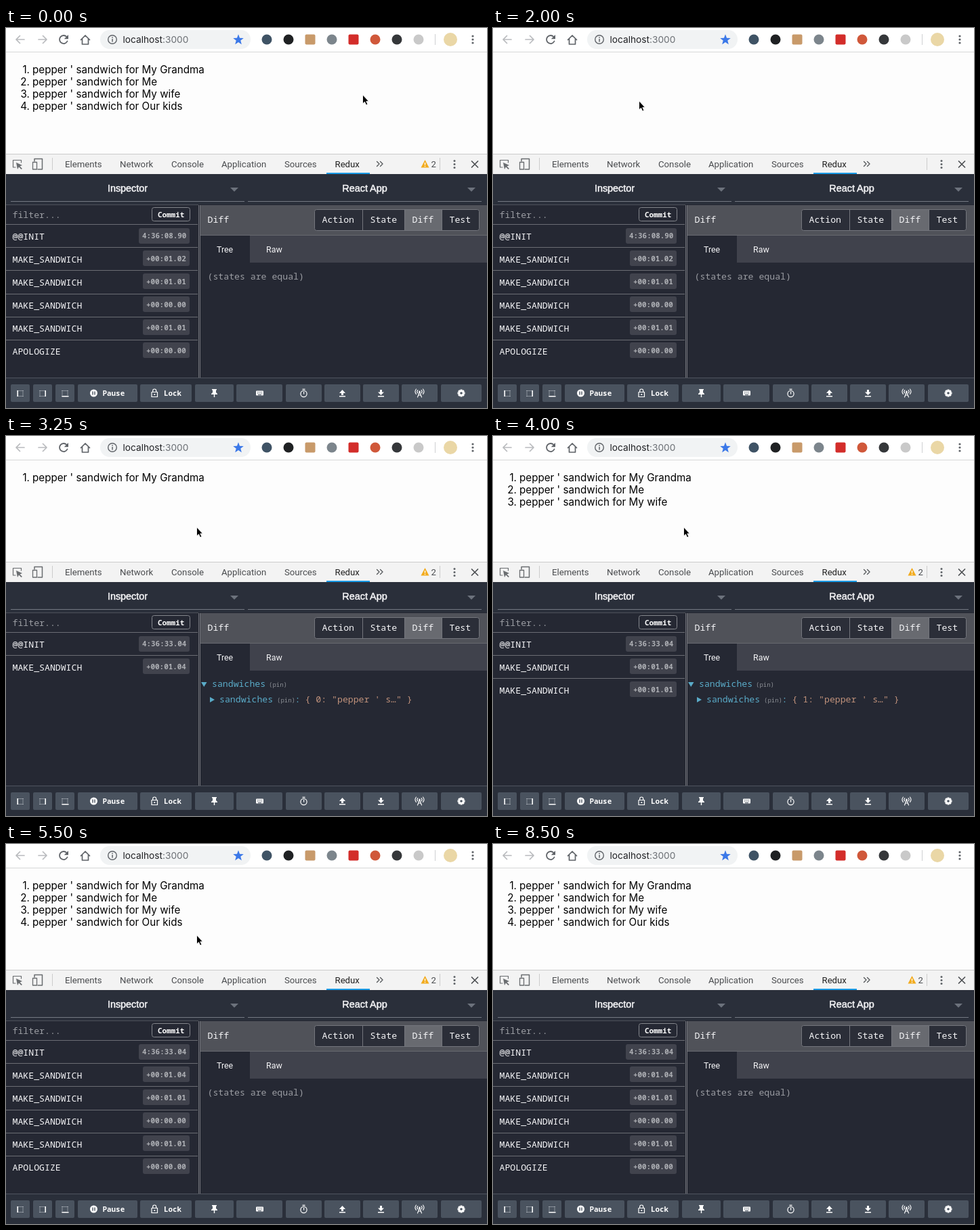
Recreate the animation shown at these times as an HTML page. Size 710 by 562 pixels, loop 9.25 s.

```html
<!DOCTYPE html>
<html lang="en">
<head>
<meta charset="utf-8">
<title>Sandwich store inspector</title>
<style>
html, body { margin: 0; width: 100%; height: 100%; overflow: hidden; background: #fdfdfd; }
svg { display: block; width: 710px; height: 562px; }
text { white-space: pre; }
.page { font: 15.2px Inter, sans-serif; fill: #000; }
.url { font: 13.7px Inter, sans-serif; fill: #202124; }
.tab { font: 13.2px Roboto, sans-serif; fill: #4a4c4f; }
.head { font: 14.4px "Liberation Sans", Arial, sans-serif; fill: #f4f4f6; stroke: #f4f4f6; stroke-width: .5px; text-anchor: middle; }
.sub { font: 12.4px Roboto, sans-serif; fill: #f4f4f6; }
.mono { font: 13.2px "Noto Sans Mono", monospace; fill: #f6f6f8; }
.bold { font: bold 10.9px "Noto Sans Mono", monospace; fill: #fff; }
.pin { font: 9px "Noto Sans Mono", monospace; fill: #8d9096; }
.dim { fill: #9b9da3; }
.line { fill: none; stroke-linecap: round; stroke-linejoin: round; }
</style>
</head>
<body>
<svg id="stage" viewBox="0 0 710 562" xmlns="http://www.w3.org/2000/svg">
  <g id="base"></g>
  <g id="live"></g>
</svg>
<script>
const LOOP = 9250, STEP = 250;
const BLUE = '#5aabc8', ORANGE = '#c2937c', ICON = '#5f6368', PANE = '#252833';

const text = (x, y, s, cls, extra = '') => `<text x="${x}" y="${y}" class="${cls}" ${extra}>${s}</text>`;
const rect = (x, y, w, h, fill, extra = '') =>
  `<rect x="${x}" y="${y}" width="${w}" height="${h}" fill="${fill}" ${extra}/>`;
const dot = (x, y, r, fill) => `<circle cx="${x}" cy="${y}" r="${r}" fill="${fill}"/>`;
const ring = (x, y, r, c, w = 1) => `<circle cx="${x}" cy="${y}" r="${r}" fill="none" stroke="${c}" stroke-width="${w}"/>`;
const line = (d, c, w = 1) => `<path class="line" d="${d}" stroke="${c}" stroke-width="${w}"/>`;
const fill = (d, c) => `<path d="${d}" fill="${c}"/>`;
const dots = (x, y, gap, r, c) => [-gap, 0, gap].map(k => dot(x, y + k, r, c)).join('');

function star(cx, cy, r, c) {
  let d = '';
  for (let i = 0; i < 10; i++) {
    const a = i * Math.PI / 5 - Math.PI / 2, q = i % 2 ? r * .42 : r;
    d += `${i ? 'L' : 'M'}${(cx + q * Math.cos(a)).toFixed(2)},${(cy + q * Math.sin(a)).toFixed(2)}`;
  }
  return fill(d + 'z', c);
}

function browserBar() {
  const marks = [[385, '#3f5365'], [417, '#1f2123'], [449, '#c89a6a', 1], [481, '#7c858c'],
    [513, '#d32d2a', 1], [545, '#d0583a'], [577, '#35373a'], [609, '#c9c9c9']];
  return rect(0, 0, 710, 36, '#fff') + rect(0, 35, 710, 1, '#d6d7d8') +
    line('M27,17H15.5M20.5,11.5L15,17L20.5,22.5M48,17H59.5M54.500,11.5L60,17L54.5,22.5', '#b9bbbe', 1.7) +
    line('M110.500,17.500L117,11L123.500,17.500M112.500,16V24H121.500V16', ICON, 1.7) +
    marks.map(([x, c, sq]) => sq ? rect(x - 7.5, 9.5, 15, 15, c, 'rx="2"') : dot(x, 17, 7.5, c)).join('') +
    rect(633, 9, 1, 16, '#cfd0d2') + dot(656, 17, 10, '#ead7a6') + dots(689, 17, 5, 1.6, ICON);
}

function toolbar() {
  const tabs = [[87, 'Elements'], [168, 'Network'], [244, 'Console'], [318, 'Application'], [411, 'Sources'], [485.5, 'Redux']];
  return rect(0, 186, 710, 30, '#f3f3f3') + rect(0, 186, 710, 1, '#cbcbcb') +
    rect(473, 214, 64, 2, '#1a9be6') +
    line('M14,206H10.500V195.500H22.500V199', '#6a6d70', 1.2) + fill('M15,199L24,203L20.500,204.500L24,208L22.500,209L19,205.500L17,209z', '#6a6d70') +
    line('M42,197V193.500H53.500V209H47', '#6a6d70', 1.5) + line('M39.500,198.500H45.500V209H39.500z', '#6a6d70', 1.3) +
    rect(68, 192, 1, 18, '#ccc') + rect(640, 192, 1, 18, '#ccc') +
    tabs.map(([x, s]) => text(x, 206, s, 'tab', s === 'Redux' ? 'style="fill:#222"' : '')).join('') +
    line('M547.500,197.500L551,201L547.500,204.500M552.500,197.500L556,201L552.500,204.500', '#55585b', 1.4) +
    dots(662, 201.5, 5, 1.5, ICON) + line('M687.500,197L696.500,206M696.500,197L687.500,206', '#4d5053', 1.7);
}

function header() {
  const caret = x => fill(`M${x - 6},236H${x + 6}L${x},242z`, '#6c727c');
  return rect(0, 216, 710, 346, '#2a2f3a') +
    text(179.5, 242, 'Inspector', 'head') + text(529.5, 242, 'React App', 'head') + caret(337) + caret(687) +
    rect(7, 256, 345, 1, '#747983') + rect(357, 256, 345, 1, '#747983');
}

function panes() {
  const tabs = [[467, 'Action'], [538, 'State'], [600, 'Diff'], [655, 'Test']];
  return rect(0, 261, 710, 256, PANE) + rect(0, 261, 284, 1, '#4e5159') +
    text(9.5, 281, 'filter...', 'mono dim') + rect(0, 290, 283, 1, '#6b6d74') +
    rect(284, 262, 1, 255, '#74767c') + rect(286, 262, 1, 255, '#74767c') +
    rect(287, 262, 423, 45, '#505259') + rect(287, 306, 423, 1, '#676970') + text(297.5, 288, 'Diff', 'mono') +
    rect(455.5, 268.5, 243, 31, '#2b2e38', 'rx="3" stroke="#74767d"') + rect(588, 269, 55, 30, '#686a70') +
    [526, 588, 643].map(x => rect(x, 269, 1, 30, '#74767d')).join('') +
    tabs.map(([x, s]) => text(x - .5, 288, s, 'mono')).join('') +
    rect(287, 307, 423, 40, '#40424c') + rect(287, 307, 73, 40, PANE) +
    text(311, 332, 'Tree', 'sub') + text(384, 332, 'Raw', 'sub');
}

function dock(x, side) {
  let s = '';
  for (let k = 0; k <= 8; k += 2)
    for (const [a, b] of [[k, 0], [k, 8], [0, k], [8, k]]) s += rect(x - 5 + a, 536 + b, 1, 1, '#c9ced4');
  return s + (side === 'b' ? rect(x - 5, 544, 10, 1.5, '#fff') : rect(side === 'l' ? x - 5 : x + 3, 536, 1.5, 9, '#fff'));
}

function footer() {
  const W = '#fff';
  const spans = [[7, 35], [40, 68], [73, 101], [106, 194], [198, 274], [279, 336], [340, 408],
    [413, 466], [470, 523], [527, 580], [584, 637], [642, 702]];
  const gear = [0, 45, 90, 135].map(a => `<rect x="670.5" y="534.500" width="3" height="11" fill="#fff" transform="rotate(${a} 672 540)"/>`).join('');
  const arrow = (x, up) => fill(up ? `M${x - 4.5},540L${x},535L${x + 4.5},540H${x + 1.5}V543H${x - 1.5}V540z`
    : `M${x - 4.5},538.500L${x},543L${x + 4.5},538.500H${x + 1.5}V535H${x - 1.5}V538.500z`, W) + rect(x - 4.5, 544, 9, 1.5, W);
  let keys = '';
  for (let i = 0; i < 8; i++) keys += rect(371 + i % 4 * 2, 538 + (i >> 2) * 2, 1, 1, '#4a5460');
  return rect(0, 517, 710, 1, '#4f545e') +
    spans.map(([a, b]) => rect(a, 527, b - a, 26, '#4a535f', 'rx="2"')).join('') +
    dock(21.5, 'l') + dock(54.5, 'r') + dock(87.5, 'b') +
    dot(129.5, 540, 5.5, W) + rect(127.3, 537.5, 1.4, 5, '#4a535f') + rect(130.3, 537.5, 1.4, 5, '#4a535f') +
    text(142.5, 544, 'Pause', 'bold') + text(233, 544, 'Lock', 'bold') +
    line('M215,538.500H223.500V545.500H215zM216.700,538V536.500A2.500,2.500 0 0 1 221.700,536.500V538', W, 1.2) + dot(219.3, 542, 1.1, W) +
    fill('M304,534H311V535.500H310V539L312,541V542H308.200V546H306.800V542H303V541L305,539V535.500H304z', W) +
    rect(369, 536.5, 11, 7, W, 'rx="1"') + keys + rect(372, 542, 5, 1, '#4a5460') +
    ring(439.5, 541, 4.6, W, 1.2) + rect(437.5, 533.7, 4, 1.3, W) + rect(439, 538, 1.2, 3.5, W) +
    arrow(496.5, true) + arrow(553.5, false) +
    line('M607.500,546L610.500,538L613.500,546M608.700,543H612.300M607.800,540A3.500,3.500 0 0 1 607.800,535.500M613.200,540A3.500,3.500 0 0 0 613.200,535.500M605.500,541.500A6,6 0 0 1 605.500,534M615.500,541.500A6,6 0 0 0 615.500,534', W, 1.1) + dot(610.5, 537.8, 1.2, W) +
    gear + dot(672, 540, 4.2, W) + dot(672, 540, 1.8, '#4a535f');
}

// Value of the last [time, value] entry reached.
const at = (t, keys) => keys.reduce((v, [k, x]) => t >= k ? x : v, null);

const eaters = ['My Grandma', 'Me', 'My wife', 'Our kids'];
const listLen = [[0, 4], [1500, 0], [3000, 1], [4000, 3], [5000, 4]];
const rowCount = [[0, 6], [2500, 1], [3000, 2], [4000, 3], [4500, 4], [5000, 5], [5500, 6]];
const diffItem = [[0, null], [3000, 0], [4000, 1], [4500, 2], [5000, 3], [5500, null]];
const pointer = [[0, [525, 98]], [250, [465, 110]], [500, [455, 113]], [1000, [120, 22]], [1250, [78, 20]],
  [2000, [214, 107]], [2250, [280, 134]], [6500, [621, 66]], [6750, null], [8250, [99, 32]], [8500, null]];

function address(t) {
  const focus = t >= 750 && t < 1500;
  const box = focus ? rect(139, 3, 222, 28, '#fff', 'rx="14" stroke="#a9c8f8" stroke-width="2"')
    : rect(139, 3, 222, 28, '#f1f3f4', 'rx="14"');
  const picked = t >= 750 && t < 1250 ? rect(172, 8, 99, 18, '#b3d5fd') : '';
  const hover = t >= 1250 && t < 1500 ? dot(85, 17, 14, '#eeeff0') : '';
  const reload = t >= 1500 && t < 2000 ? line('M80,12L90,22M90,12L80,22', ICON, 1.8)
    : line('M90.500,19.500A6,6 0 1 1 89.500,13', ICON, 1.8) + fill('M92,10V16.200H85.800z', ICON);
  return box + picked + hover + reload + ring(157, 17, 6.3, ICON, 1.4) + rect(156.3, 16, 1.5, 4.5, ICON) + rect(156.3, 13.2, 1.5, 1.6, ICON) +
    text(172.5, 22, 'localhost<tspan fill="#6b6f74">:3000</tspan>', 'url') + star(343, 17.5, 8.2, '#3b78e8');
}

function sandwiches(t) {
  return eaters.slice(0, at(t, listLen)).map((who, i) =>
    text(35, 67 + 18 * i, i + 1 + '.', 'page', 'text-anchor="end"') +
    text(39, 67 + 18 * i, `pepper ' sandwich for ${who}`, 'page')).join('');
}

function history(t) {
  const fresh = t >= 2500;
  const stamps = [fresh ? '4:36:33.04' : '4:36:08.90', fresh ? '+00:01.04' : '+00:01.02',
    '+00:01.01', '+00:00.00', '+00:01.01', '+00:00.00'];
  return stamps.slice(0, at(t, rowCount)).map((stamp, i) => {
    const y = 34 * i, x = i ? 202 : 196;
    const name = i === 0 ? '@@INIT' : i === 5 ? 'APOLOGIZE' : 'MAKE_SANDWICH';
    return (i ? rect(0, 290 + Math.round(34.2 * i), 283, 1, '#6b6d74') : '') +
      text(9.5, 313 + y, name, 'mono') + rect(x, 296 + y - (i > 0), 271 - x, 23, '#41434d', 'rx="3"') +
      text(x + 5, 311 + y, stamp, 'bold', 'style="fill:#aeb0b5"');
  }).join('');
}

function diff(t) {
  const n = at(t, diffItem);
  if (n === null) return text(297.5, 372, '(states are equal)', 'mono dim');
  const paint = c => `style="fill:${c}"`;
  return fill('M288,364H296.500L292.250,371z', BLUE) + text(304, 371, 'sandwiches', 'mono', paint(BLUE)) + text(388, 371, '(pin)', 'pin') +
    fill('M301,386L308,390L301,394z', BLUE) + text(315, 394, 'sandwiches', 'mono', paint(BLUE)) + text(400, 394, '(pin)', 'pin') +
    text(426.5, 394, ':', 'mono', paint(BLUE)) + text(441.5, 394, `{ ${n}: "pepper ' s…" }`, 'mono', paint(ORANGE));
}

function draw(t) {
  let s = address(t) + sandwiches(t) + history(t) + diff(t);
  if (t < 1750 || t >= 2250)
    s += fill('M618.500,195L624.500,206.500H612.500z', '#f2ab1e') + rect(617.8, 199, 1.4, 3.6, '#fff') + rect(617.8, 203.8, 1.4, 1.4, '#fff') + text(627.5, 206, '2', 'tab');
  if (t < 2500 || t >= 3250)
    s += rect(215.5, 265.5, 56, 20, PANE, 'rx="3" stroke="#85878d"') + text(224, 279.5, 'Commit', 'bold');
  const p = at(t, pointer);
  if (p) s += `<path transform="translate(${p})" d="M1.500,.8V14L4.500,11.200L6.600,16L8.900,15L6.800,10.400H10.500z" fill="#000" stroke="#fff" stroke-width=".9"/>`;
  document.getElementById('live').innerHTML = s;
}

document.getElementById('base').innerHTML =
  rect(0, 0, 710, 562, '#fdfdfd') + browserBar() + toolbar() + header() + panes() + footer();

const start = performance.now();
let shown = -1;
function tick() {
  const t = Math.floor((performance.now() - start) % LOOP / STEP) * STEP;
  if (t !== shown) draw(shown = t);
  requestAnimationFrame(tick);
}
tick();
</script>
</body>
</html>
```
